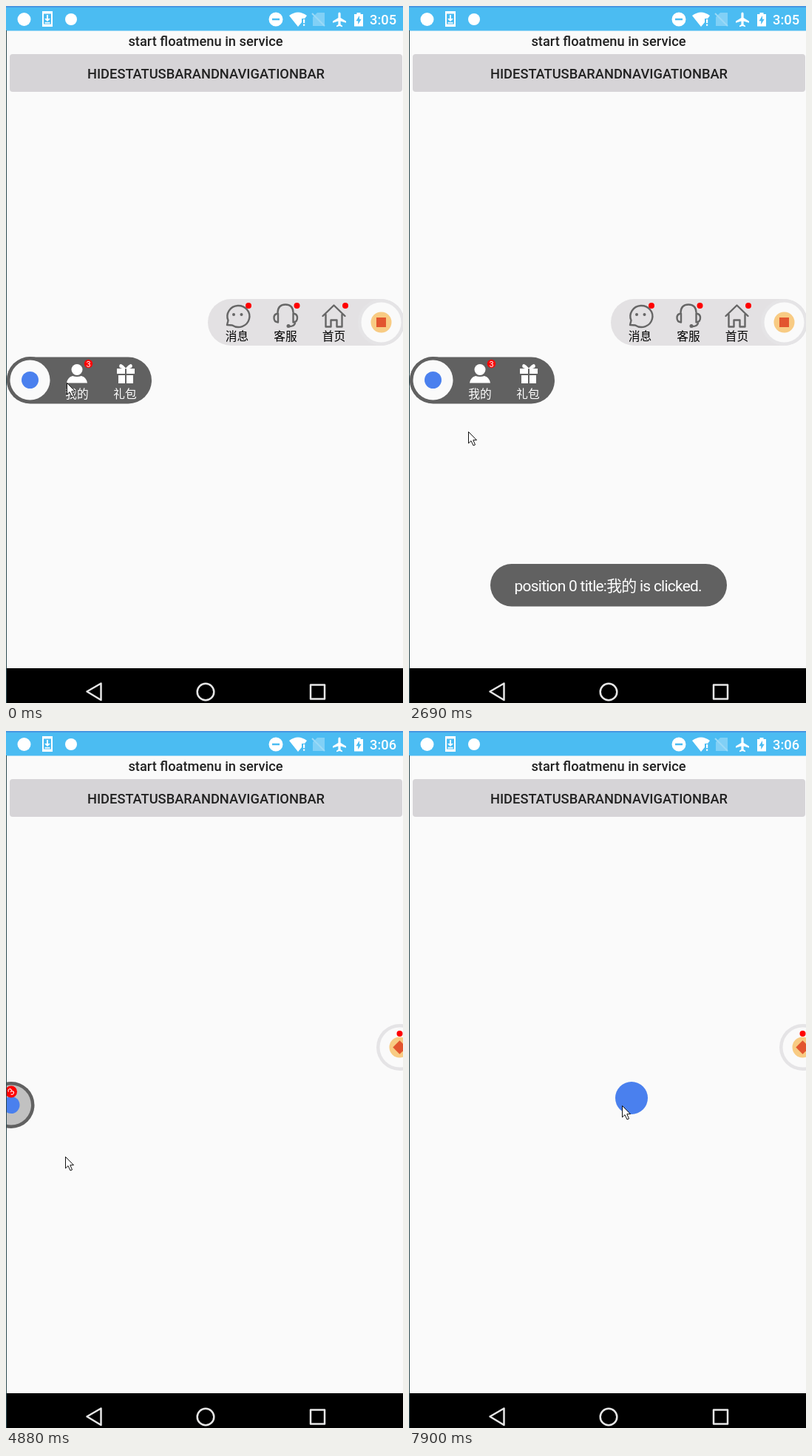
An HTML page for the animation above (8 s loop, 537 by 942 pixels).

```html
<!DOCTYPE html>
<html lang="zh">
<head>
<meta charset="utf-8">
<title>Float menu</title>
<style>
  html, body { margin: 0; width: 100%; height: 100%; overflow: hidden; background: #fafafa; }
  svg { display: block; font: 500 18.3px Roboto, "Noto Sans CJK SC", sans-serif; }
  .mid { text-anchor: middle; }
  .label { font: 15.7px "Noto Sans CJK SC", "Noto Sans CJK", sans-serif; text-anchor: middle; }
  .badge { font-weight: 400; text-anchor: middle; fill: #fff; }
  #toast text { font-size: 20.9px; font-weight: 400; letter-spacing: -.72px; fill: #fff; }
  .line { fill: none; stroke: #666; stroke-width: 2.4; stroke-linejoin: round; stroke-linecap: round; }
</style>
</head>
<body>
<svg width="537" height="942" viewBox="0 0 537 942">
  <rect width="537" height="942" fill="#fafafa"/>

  <!-- status bar -->
  <rect width="537" height="33.5" fill="#4bbcf2"/>
  <rect width="537" height="2" fill="#4797e2"/>
  <g fill="#fff">
    <circle cx="24.5" cy="18" r="9"/>
    <path d="M49 7h14v21H49zM51 10.5v14h10v-14z" fill-rule="evenodd"/>
    <path d="M55 12h2v5h3l-4 4-4-4h3zM52.500 22h7v1.500h-7z"/>
    <circle cx="88" cy="18" r="8"/>
    <path d="M355.500 18a9.500 9.500 0 1 0 19 0a9.500 9.500 0 1 0-19 0M360 16.700v2.600h10v-2.600z" fill-rule="evenodd"/>
    <path d="M383 13Q395 4 407 13L404 17H400V22L395 28Z"/>
    <path d="M402 18h2.200v5H402zM402 24.500h2.200v2.300H402z"/>
    <path d="M421 9h10v18h-16V15z" opacity=".3"/>
    <path d="M451 8.500q1.600 0 1.600 2v5.500l7.400 4.500v2.200l-7.400-2.300v4.600l2.400 1.800v1.500l-4-1.200-4 1.200v-1.500l2.400-1.800v-4.600l-7.400 2.300v-2.200l7.400-4.500v-5.500q0-2 1.600-2z"/>
    <path d="M471 11h3.500V9h5v2h3.500v16.500h-12zM478 13l-4.500 7.200h2.700V25l4.500-7.200H478z" fill-rule="evenodd"/>
    <text id="clock" x="492" y="25">3:05</text>
  </g>
  <path d="M414 10l17 17" stroke="#9bd9f7" stroke-width="2"/>

  <!-- page -->
  <g class="mid" fill="#212121">
    <text x="270" y="53.500">start floatmenu in service</text>
    <rect x="5" y="65" width="531" height="51" rx="4" fill="#d6d4d7"/>
    <text x="270.500" y="97.500">HIDESTATUSBARANDNAVIGATIONBAR</text>
  </g>

  <!-- right menu -->
  <g id="rightMenu">
    <rect x="273" y="396" width="266" height="63" rx="31.500" fill="#e3e1e3"/>
    <g class="line">
      <path d="M299 431l1.500-6A15 14.500 0 1 1 306 431.500Z"/>
      <path d="M367.500 414Q368 403.500 378 403.500T388.500 414M368 415.500v12q-5.500-.5-5.500-6t5.500-6zM388.500 415.500v12q5.500-.5 5.500-6t-5.500-6zM391 429q-2 4-7 4"/>
      <path d="M428.500 419L443.500 404.500L458.500 419M432.500 417v16.500h7v-9h8v9h7V417"/>
    </g>
    <g fill="#666">
      <circle cx="308" cy="417" r="2"/><circle cx="318.500" cy="417" r="2"/><circle cx="382" cy="432.500" r="2.500"/>
    </g>
    <g fill="#f00">
      <circle cx="328" cy="405" r="4"/><circle cx="393.500" cy="405" r="4"/><circle cx="459" cy="405" r="4"/>
    </g>
    <g class="label">
      <text x="312.500" y="452">消息</text><text x="378" y="452">客服</text><text x="443.500" y="452">首页</text>
    </g>
  </g>
  <g id="rightBall">
    <circle r="31.500" fill="#e5e4e6"/>
    <circle r="27" fill="#fafafa"/>
    <circle r="14" fill="#f8cb83"/>
    <rect id="rightMark" x="-6.500" y="-6.500" width="13" height="13" fill="#e2552f"/>
    <circle id="rightDot" cy="-18.500" r="4" fill="#f00"/>
  </g>

  <!-- left menu -->
  <g id="leftMenu" fill="#fff">
    <rect x="1" y="474.500" width="196" height="63" rx="31.500" fill="#616161"/>
    <circle cx="96" cy="491.500" r="7.500"/>
    <path d="M82 509.500Q83 502 90 500Q96 502 102 500Q109 502 110 509.500Z"/>
    <path d="M150 490h11v7h-11zM163 490h11v7h-11zM152 499h9v11h-9zM163 499h9v11h-9z"/>
    <path d="M161 489.500q-8 0-7-3.500t7 3.500zM163 489.500q8 0 7-3.500t-7 3.500z" stroke="#fff" stroke-width="1.500"/>
    <g class="label"><text x="96" y="530">我的</text><text x="161" y="530">礼包</text></g>
    <circle cx="111.500" cy="483.500" r="5.700" fill="#f00"/>
    <text class="badge" x="111.500" y="487.500" font-size="11">3</text>
  </g>
  <g id="leftBall">
    <g id="leftShell">
      <circle r="31.500" fill="#616161"/>
      <circle id="leftFace" r="27"/>
    </g>
    <circle id="leftMark" fill="#4a80ee"/>
    <g id="leftBadge" transform="translate(0 -18) rotate(-45)">
      <circle r="8" fill="#f00"/>
      <text class="badge" y="4.500" font-size="13">3</text>
    </g>
  </g>

  <g id="toast">
    <rect x="110" y="754" width="320" height="57.500" rx="28.750" fill="#616161"/>
    <text x="142.500" y="791">position 0 title:我的 is clicked.</text>
  </g>

  <!-- navigation bar -->
  <rect y="895" width="537" height="47"/>
  <g fill="none" stroke="#e6e6e6" stroke-width="2.500" stroke-linejoin="round">
    <path d="M109.500 926.500L128.500 915.500V938Z"/>
    <circle cx="270" cy="927" r="11.300"/>
    <rect x="412" y="917.500" width="19" height="19"/>
  </g>
  <rect y="33" width="1" height="909" fill="#2c4a50"/>

  <path id="cursor" d="M.5 .5V16L4 12.700L7 19L9.500 18L6.800 11.700H11.500Z" fill="#fff" stroke="#111"/>
</svg>
<script>
const LOOP = 8000;
const $ = id => document.getElementById(id);
const show = (id, on) => $(id).setAttribute("visibility", on ? "visible" : "hidden");
const place = (id, x, y) => $(id).setAttribute("transform", `translate(${x} ${y})`);
const smooth = p => p * p * (3 - 2 * p);

// Progress 0..1 in n equal jumps; the first falls on start, the last on end.
function burst(t, start, end, n) {
  if (t < start) return 0;
  if (t >= end) return 1;
  return (Math.floor((t - start) / (end - start) * (n - 1) + .05) + 1) / n;
}

// Each leg: start, end, jumps, x, y
function follow(t, x, y, legs) {
  for (const [start, end, n, toX, toY] of legs) {
    const p = smooth(burst(t, start, end, n));
    x += (toX - x) * p;
    y += (toY - y) * p;
  }
  return [x, y];
}

const cursorLegs = [
  [280, 1130, 7, 92, 507],
  [1556, 2140, 5, 80, 575],
  [5270, 5720, 4, 10, 526],
  [6020, 6020, 1, 20, 517],
  [6420, 7390, 8, 298, 501],
  [7510, 7770, 3, 312, 506],
  [7900, 7900, 1, 288, 506]
];
const ballLegs = [
  [4880, 4880, 1, 7, 505.5],
  [6020, 6020, 1, 32.5, 505.5],
  [6420, 7390, 8, 278, 489],
  [7510, 7900, 4, 301, 496]
];

function draw(t) {
  const open = t < 3115, docked = t >= 4880, grabbed = t >= 6020, dragged = t >= 6420;

  $("clock").textContent = open ? "3:05" : "3:06";
  $("toast").setAttribute("opacity", burst(t, 1410, 1702, 3) - burst(t, 3257, 3540, 3));
  show("leftMenu", open);
  show("rightMenu", open);

  place("rightBall", docked ? 532.5 : 507.5, 427.5);
  $("rightMark").setAttribute("transform", `rotate(${docked ? 45 : 0})`);
  show("rightDot", docked);

  place("leftBall", ...follow(t, 32.5, 505.5, ballLegs));
  show("leftShell", !dragged);
  show("leftBadge", docked && !grabbed);
  $("leftFace").setAttribute("fill", open || grabbed ? "#fafafa" : "#c1c1c1");
  $("leftMark").setAttribute("r", dragged ? 22 : 11.5);

  place("cursor", ...follow(t, 82, 509, cursorLegs));
}

const begin = performance.now();
function tick() {
  draw((performance.now() - begin) % LOOP);
  requestAnimationFrame(tick);
}
tick();
</script>
</body>
</html>
```
